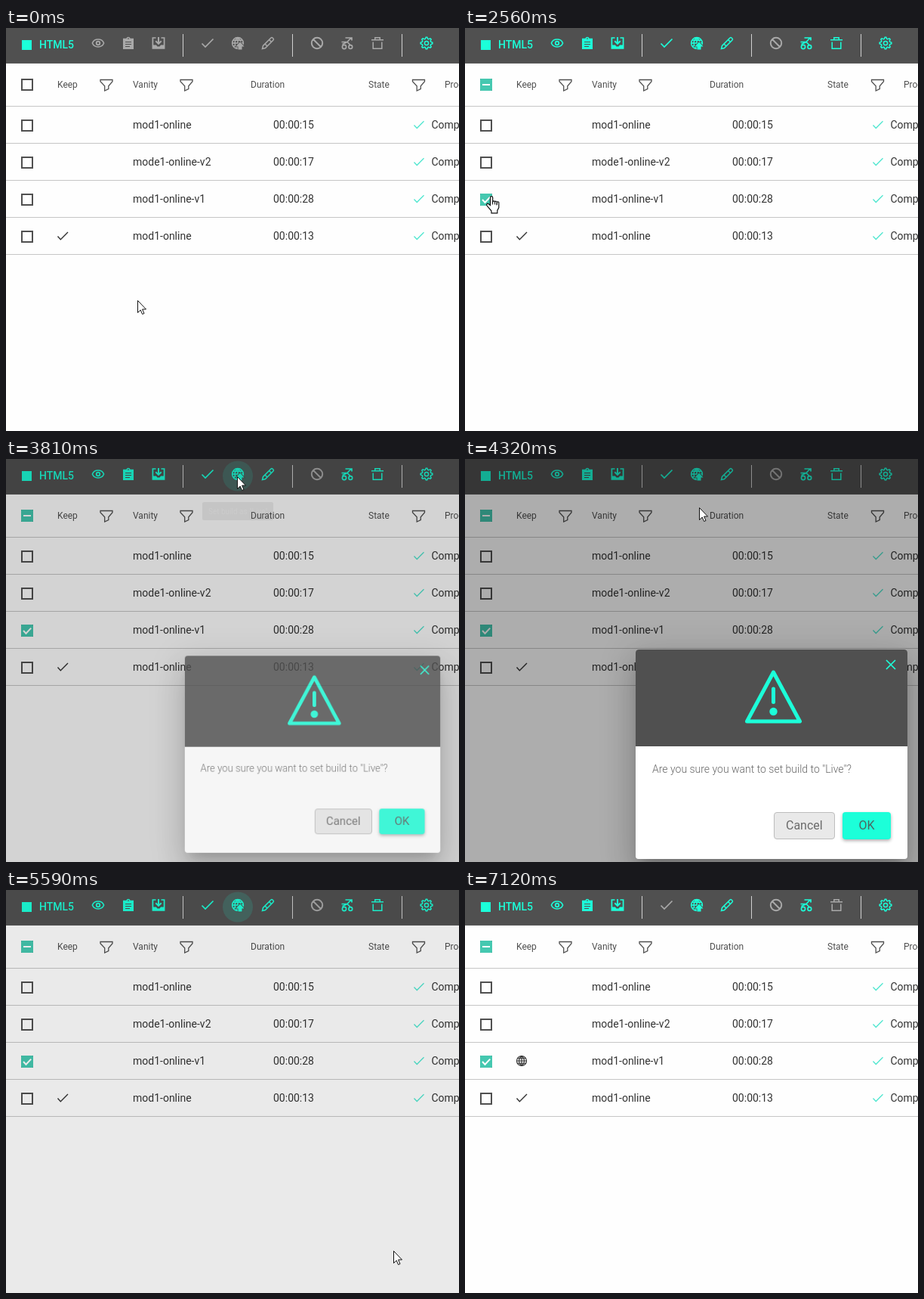
Write an HTML page with a canvas that moves like this. It is 600x533 px and loops after 7.52 s.

```html
<!DOCTYPE html>
<html lang="en">
<head>
<meta charset="utf-8">
<title>Build list</title>
<style>
html, body { margin: 0; width: 100%; height: 100%; overflow: hidden; background: #fff; }
canvas { display: block; }
</style>
</head>
<body>
<canvas id="stage" width="600" height="533"></canvas>
<script>
const W = 600, H = 533, LOOP = 7520;
const TEAL = '#1cffd9', GREY = '#a9a9a9', DARK = '#505050', INK = '#333';
const FONT = 'Roboto, "Open Sans", sans-serif';
const stage = document.getElementById('stage').getContext('2d');
let g = stage;

// value of the last step whose time has passed
function stepAt(t, steps) {
  let value = steps[0];
  for (const s of steps) if (t >= s[0]) value = s;
  return value;
}
const valueAt = (t, steps) => stepAt(t, [[0, 0], ...steps])[1];

function text(str, x, y, size, color, weight = 400) {
  g.font = `${weight} ${size}px ${FONT}`;
  g.fillStyle = color;
  g.fillText(str, x, y);
}
function rect(x, y, w, h, color) {
  g.fillStyle = color;
  g.fillRect(x, y, w, h);
}
function roundRect(x, y, w, h, r) {
  g.beginPath();
  g.roundRect(x, y, w, h, r);
}
function stroke(x, y, d, color, width, fill) {
  const p = new Path2D(d);
  g.save();
  g.translate(x, y);
  if (fill) { g.fillStyle = fill; g.fill(p); }
  g.strokeStyle = color;
  g.lineWidth = width;
  g.stroke(p);
  g.restore();
}
function fill(x, y, d, color) {
  g.save();
  g.translate(x, y);
  g.fillStyle = color;
  g.fill(new Path2D(d));
  g.restore();
}
const ring = r => `M${-r} 0A${r} ${r} 0 1 1 ${r} 0A${r} ${r} 0 1 1 ${-r} 0z`;
const globe = r => ring(r) + `M0 ${-r}V${r}M${-r} 0H${r}` +
  `M0 ${-r}C${-r * .7} ${-r / 2} ${-r * .7} ${r / 2} 0 ${r}C${r * .7} ${r / 2} ${r * .7} ${-r / 2} 0 ${-r}` +
  `M${-r * .86} ${-r / 2}H${r * .86}M${-r * .86} ${r / 2}H${r * .86}`;

function gear() {
  let d = '';
  for (let i = 0; i < 32; i++) {
    const a = (i - .5) / 32 * Math.PI * 2, r = i % 4 < 2 ? 7.9 : 5.9;
    d += (i ? 'L' : 'M') + (r * Math.cos(a)).toFixed(2) + ' ' + (r * Math.sin(a)).toFixed(2);
  }
  return d + 'z' + ring(2.6);
}
const GEAR = gear();
const TICK = 'M-7.5 .5L-3 5L7.5 -5.5';
const FUNNEL = 'M-8 -6.5H8V-4.3L2.8 1.8V5.5L-2.3 8V1.8L-8 -4.3z';
const ARROW = 'M.5 .5V16.5L4.2 13L6.6 18.5L9 17.5L6.6 12H11.5z';
const HAND = 'M5.5 12.5V2.2a1.6 1.6 0 0 1 3.2 0V7.8a1.5 1.5 0 0 1 2.9 .3a1.4 1.4 0 0 1 2.7 .6' +
  'a1.3 1.3 0 0 1 2.5 .8V15.5L14.8 19.5V22.8H7V20L1 12.9A1.5 1.5 0 0 1 3.3 10.8z';

// toolbar icons: centre x, drawing, and whether each is lit when a row is chosen or live
const ICONS = [
  [122, c => {
    stroke(122, 20, 'M-7.6 0C-5 -6.6 5 -6.6 7.6 0C5 6.6 -5 6.6 -7.6 0z', c, 1.6);
    stroke(122, 20, ring(2.3), c, 1.8);
  }, 1, 1],
  [162, c => {
    fill(162, 20, 'M-7 -6.3H-2.6A2.7 2.7 0 0 1 2.6 -6.3H7V8H-7z', c);
    stroke(162, 20, 'M-4 -1.5H4M-4 1.5H4M-4 4.5H2', DARK, 1);
    stroke(162, 20, 'M-.7 -6H.7', DARK, 1.4);
  }, 1, 1],
  [202, c => {
    stroke(202, 20, 'M-3.5 -7H-7.6V7H7.6V-7H3.5', c, 1.7);
    fill(202, 20, 'M-7.6 2.5H-3L-1.5 4.5H1.5L3 2.5H7.6V7H-7.6z', c);
    stroke(202, 20, 'M0 -8V0M-3.7 -2.8L0 .9L3.7 -2.8', c, 2);
  }, 1, 1],
  [267, c => stroke(267, 20, TICK, c, 1.7), 1, 0],
  [307, c => {
    stroke(307, 20, globe(7.4), c, 1.5);
    stroke(310, 20, 'M0 -1.5L5.5 4.5H2.5V8.5H-2.5V4.5H-5.5z', DARK, 1.6, c);
    fill(310, 20, 'M0 -1.5L5.5 4.5H2.5V8.5H-2.5V4.5H-5.5z', c);
  }, 1, 1],
  [347, c => stroke(347, 20, 'M-7.5 7.5L-6.5 3.5L4 -7Q5 -8 6 -7L7 -6Q8 -5 7 -4L-3.5 6.5zM1.5 -4.5L4.5 -1.5M-4 1L-1 4', c, 1.5), 1, 1],
  [412, c => stroke(412, 20, ring(7.2) + 'M-5 -5L5 5', c, 2), 0, 0],
  [452, c => {
    stroke(452, 20, 'M-7.5 -1.5H0L5 -7M-2.5 -7H6V-3.5M0 -1.5L4 2.5M-6.5 1.5L0 -1.5', c, 1.7);
    stroke(448, 25, ring(2.6), c, 1.6);
    stroke(456.3, 25, ring(2.4), c, 1.6);
  }, 1, 1],
  [492, c => stroke(492, 20, 'M-8 -4.2H8M-3.2 -4.5V-7.3H3.2V-4.5M-5.8 -1.5V7.3H5.8V-1.5', c, 1.5), 1, 0]
];

function toolbar(mode, halo) {
  rect(0, 0, W, 47, DARK);
  rect(0, 46, W, 1, '#5c5c5c');
  if (halo) {
    g.globalAlpha = .14;
    fill(307, 22.5, ring(20), TEAL);
    g.globalAlpha = 1;
  }
  rect(21, 16, 13, 13, TEAL);
  text('HTML5', 44, 27, 14, TEAL, 500);
  for (const x of [234, 379, 524]) rect(x, 8, 1, 30, '#d0d0d0');
  for (const [, draw, chosen, live] of ICONS) {
    const lit = mode === 'on' ? chosen : mode === 'live' ? live : 0;
    draw(lit ? TEAL : GREY);
  }
  stroke(557, 20, GEAR, TEAL, 1.5);
}

function checkbox(y, amount, mark) {
  g.strokeStyle = DARK;
  g.lineWidth = 2;
  g.strokeRect(21, y - 7, 14, 14);
  if (!amount) return;
  g.globalAlpha = amount;
  roundRect(20, y - 8, 16, 16, 1);
  g.fillStyle = '#45c8b0';
  g.fill();
  stroke(28, y, mark, '#fff', 2);
  g.globalAlpha = 1;
}

const ROWS = [
  ['mod1-online', '15'], ['mode1-online-v2', '17'], ['mod1-online-v1', '28'], ['mod1-online', '13']
];
function table(checked, live) {
  checkbox(75, checked, 'M-5 0H5');
  const heads = [['Keep', 68], ['Vanity', 168], ['Duration', 324], ['State', 480], ['Process', 581]];
  for (const [label, x] of heads) text(label, x, 79, 12, DARK);
  for (const x of [133, 239, 546.5]) stroke(x, 75, FUNNEL, DARK, 1.3);
  rect(0, 103, W, 1, '#c6c6c6');
  ROWS.forEach(([name, sec], i) => {
    const y = 128 + i * 49;
    checkbox(y + 1, i === 2 ? checked : 0, 'M-5 0L-1.5 3.8L5.2 -3.4');
    text(name, 168, y + 5, 14, INK);
    text('00:00:' + sec, 354, y + 5, 14, INK);
    stroke(547, y, 'M-6.5 .5L-2.7 4.5L6.5 -4.7', '#4fe6cf', 1.3);
    text('Completed', 563.5, y + 5, 14, INK);
    rect(0, y + 24, W, 1, '#c6c6c6');
  });
  stroke(75, 275, 'M-6.5 .5L-2.7 4.7L7 -5', INK, 1.4);
  if (live) stroke(75, 226, globe(6.5), INK, 1.2);
}

function tooltip(alpha) {
  g.globalAlpha = alpha;
  roundRect(260, 57, 94, 24, 2);
  g.fillStyle = '#616161';
  g.fill();
  text('Set build as "Live"', 268, 72.5, 10, '#fff');
  g.globalAlpha = 1;
}

// soft shadow alone: the casting shape stays off stage
function shadow(x, y, w, h, r, dy, blur, alpha) {
  g.save();
  g.shadowColor = `rgba(0,0,0,${alpha})`;
  g.shadowBlur = blur;
  g.shadowOffsetX = 2000;
  g.shadowOffsetY = dy;
  roundRect(x - 2000, y, w, h, r);
  g.fillStyle = '#000';
  g.fill();
  g.restore();
}

const BOX = { x: 226, y: 252, w: 360, h: 277 };
const sheet = document.createElement('canvas');
sheet.width = W;
sheet.height = H;
const sheetCtx = sheet.getContext('2d');

function paintDialog(ripple) {
  const { x, y, w, h } = BOX;
  g.clearRect(0, 0, W, H);
  g.save();
  roundRect(x, y, w, h, 4);
  g.clip();
  rect(x, y, w, h, '#fff');
  rect(x, y, w, 128, DARK);
  g.lineJoin = 'round';
  stroke(408.5, 315, 'M0 -33L35 32H-35z', TEAL, 5);
  g.lineCap = 'round';
  stroke(408.5, 313, 'M0 -9V8.5', TEAL, 5);
  g.lineCap = 'butt';
  fill(408.5, 334, ring(5.2), TEAL);
  stroke(564, 272, 'M-6 -6L6 6M6 -6L-6 6', TEAL, 1.7);
  text('Are you sure you want to set build to "Live"?', 248, 415, 14, '#666', 300);

  roundRect(409.5, 467.5, 80, 35, 3.5);
  g.fillStyle = ripple ? '#f6f6f6' : '#e9e9e9';
  g.fill();
  g.strokeStyle = '#bdbdbd';
  g.lineWidth = 1;
  g.stroke();
  text('Cancel', 425, 490, 16, '#6a6a6a');

  shadow(500, 467, 64, 36, 4, ripple ? 4 : 2, ripple ? 8 : 4, ripple ? .42 : .32);
  roundRect(500, 467, 64, 36, 4);
  g.fillStyle = TEAL;
  g.fill();
  if (ripple) {
    g.save();
    g.clip();
    g.globalAlpha = .1;
    fill(516, 480, ring(ripple), '#000');
    g.restore();
  }
  text('OK', 521.5, 490, 16, '#4c6660');
  g.restore();
}

function dialog(alpha, scale, ripple) {
  g = sheetCtx;
  paintDialog(ripple);
  g = stage;
  const cx = BOX.x + BOX.w / 2, cy = BOX.y + BOX.h / 2;
  const w = BOX.w * scale, h = BOX.h * scale, x = cx - w / 2, y = cy - h / 2;
  g.save();
  g.globalAlpha = alpha;
  g.save();
  g.beginPath();
  g.rect(0, 0, W, H);
  g.roundRect(x, y, w, h, 4);
  g.clip('evenodd');
  shadow(x + 7, y + 7, w - 14, h - 14, 4, 11, 15, .2);
  shadow(x - 3, y - 3, w + 6, h + 6, 4, 24, 38, .14);
  shadow(x - 8, y - 8, w + 16, h + 16, 4, 9, 46, .12);
  g.restore();
  g.translate(cx, cy);
  g.scale(scale, scale);
  g.drawImage(sheet, -cx, -cy);
  g.restore();
}

const PATH = [
  [0, 174, 360], [790, 162, 348], [930, 120, 313], [1080, 65, 283], [1200, 28, 258],
  [1350, 26, 240], [1470, 26, 227], [1620, 24, 223], [2560, 28, 222], [2680, 72, 209],
  [2830, 161, 145], [2990, 236, 90], [3140, 268, 56], [3290, 292, 38], [3420, 306, 26],
  [3570, 306, 23], [4200, 308, 42], [4320, 310, 64], [4480, 363, 208], [4620, 415, 322],
  [4740, 450, 388], [4900, 487, 442], [5050, 500, 464], [5200, 508, 477], [5590, 513, 477],
  [6660, 521, 486], [6820, 540, 511], [6970, 555, 531]
];
function cursor(t) {
  if (t >= 7120) return;
  const [, x, y] = stepAt(t, PATH);
  const hand = (t >= 1470 && t < 2680) || (t >= 5200 && t < 5590);
  if (hand) {
    stroke(x, y, HAND, '#111', 1.2, '#fff');
    stroke(x, y, 'M8.7 7.5V11.5M11.6 8.2V11.5M14.3 9V12', '#111', 1);
  } else {
    stroke(x, y, ARROW, '#111', 1, '#fff');
  }
}

function render(t) {
  const mode = stepAt(t, [[0, 'off'], [2050, 'on'], [5980, 'off'], [6660, 'live']])[1];
  const halo = valueAt(t, [[3570, 1], [3930, 0], [5590, 1], [5830, 0]]);
  const checked = valueAt(t, [[2050, .6], [2170, 1]]);
  const veil = valueAt(t, [[3810, .17], [3930, .28], [4080, .32], [5590, .08], [5710, .02], [5830, 0]]);
  const tip = valueAt(t, [[3420, .9], [3810, .12], [3930, 0]]);
  const shown = valueAt(t, [[3810, .8], [3930, 1], [5590, 0]]);
  const ripple = valueAt(t, [[5320, 10], [5450, 24]]);

  rect(0, 0, W, H, '#fefefe');
  table(checked, t >= 5980);
  toolbar(mode, halo);
  if (veil) rect(0, 0, W, H, `rgba(0,0,0,${veil})`);
  if (tip) tooltip(tip);
  if (shown) dialog(shown, t < 3930 ? .94 : 1, ripple);
  cursor(t);
}

const start = performance.now();
function tick() {
  render((performance.now() - start) % LOOP);
  requestAnimationFrame(tick);
}
tick();
</script>
</body>
</html>
```
